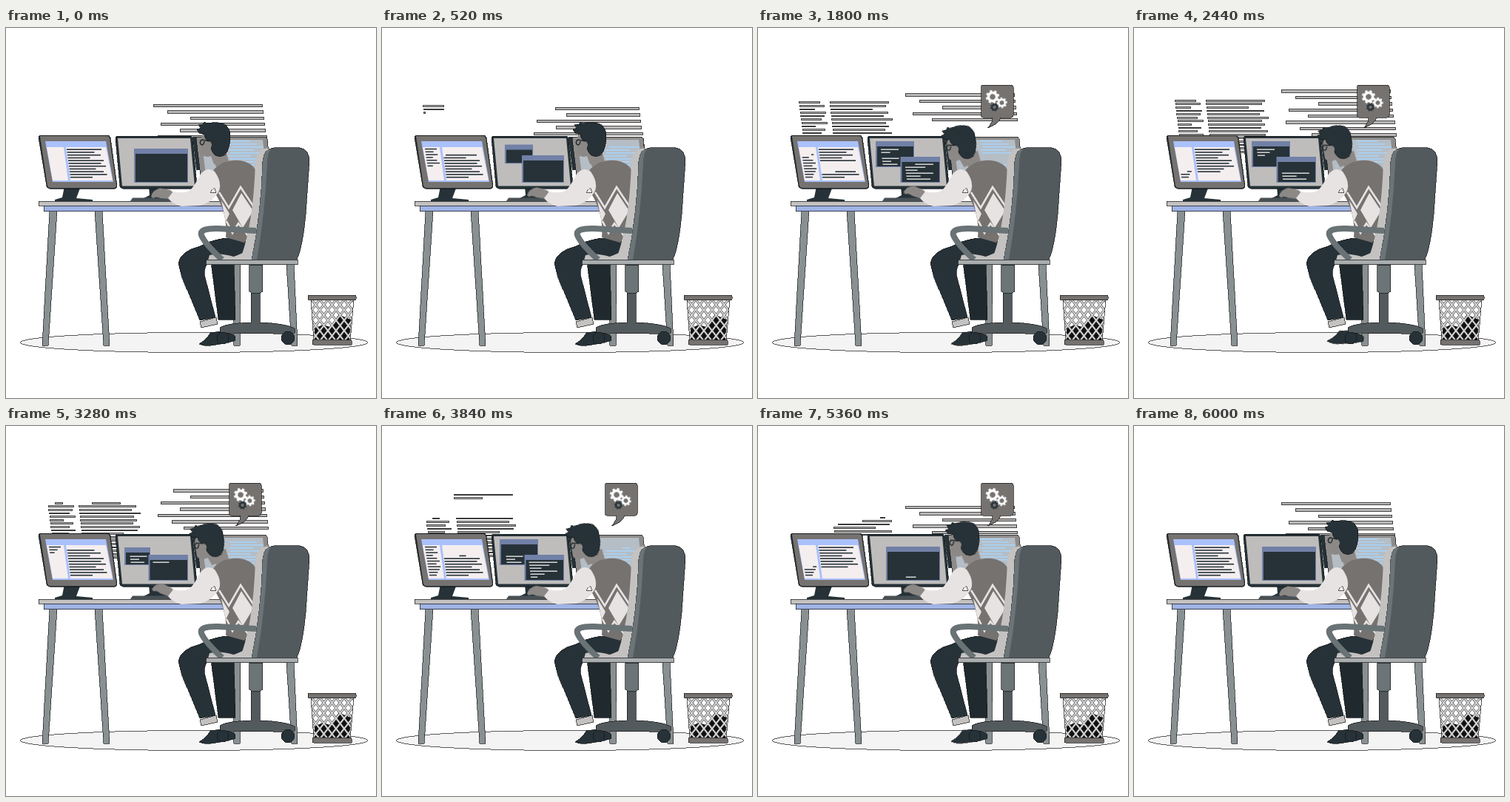
These frames come from a looping animation (500 by 500 pixels, 6040 ms). An HTML page:

```html
<!DOCTYPE html>
<html lang="en">
<head>
<meta charset="utf-8">
<title>Developer at work</title>
<style>
  html, body { margin: 0; width: 100%; height: 100%; overflow: hidden; background: #fff; }
  svg { display: block; width: 100vw; height: 100vh; }
  .o { stroke: #151515; stroke-width: .7; }
  .o, #floating { shape-rendering: crispEdges; }
  .dark { fill: #263238; }
  .steel { fill: #899092; }
  .pale { fill: #c4c2c1; }
  .slate { fill: #535a5d; }
  .grey { fill: #757270; }
  .skin { fill: #8c8886; }
  .shirt { fill: #e8e3e3; }
  .head, .foot, .hand, .bubble { animation: 6040ms linear infinite; }
  .head { animation-name: nod; transform-origin: 288px 176px; animation-timing-function: ease-in-out; }
  .foot { animation-name: tap; transform-origin: 300px 424px; }
  .hand { animation-name: type; transform-origin: 222px 228px; }
  .bubble { animation-name: pop; transform-origin: 312px 133px; }
  .gear { animation: spin 6040ms linear infinite; transform-box: fill-box; transform-origin: center; }
  .gear.back { animation-direction: reverse; }
  @keyframes nod {
    0%, 18% { transform: none; }
    26%, 84% { transform: translate(-4px, 3px) rotate(-10deg); }
    93%, 100% { transform: none; }
  }
  @keyframes tap {
    0%, 10%, 29%, 52%, 88%, 97%, 100% { transform: none; }
    18%, 40%, 92% { transform: rotate(6deg); }
  }
  @keyframes type {
    0%, 10%, 25%, 33%, 40%, 48%, 63%, 71%, 86%, 95%, 100% { transform: none; }
    5%, 18%, 29%, 36%, 44%, 54%, 67%, 78%, 90% { transform: rotate(17deg); }
  }
  @keyframes pop {
    0%, 11.5% { transform: scale(0); }
    16%, 94% { transform: none; }
    98%, 100% { transform: scale(0); }
  }
  @keyframes spin { to { transform: rotate(360deg); } }
</style>
</head>
<body>
<svg viewBox="0 0 500 500">
  <defs>
    <pattern id="mesh" width="11" height="14" patternUnits="userSpaceOnUse" x="413" y="367">
      <path d="M-1-1.27L12 15.27M12-1.27L-1 15.27" stroke="#333" stroke-width="3"/>
      <path d="M-1-1.27L12 15.27M12-1.27L-1 15.27" stroke="#d6d6d6" stroke-width="2"/>
    </pattern>
  </defs>

  <ellipse class="o" cx="254" cy="425" rx="235" ry="13.5" fill="#f4f4f4"/>
  <g id="floating" fill="#b9b7b6" stroke="#1c1c1c" stroke-width=".8"></g>

  <!-- right monitor -->
  <path class="dark" d="M252 147H259L265 192H257Z"/>
  <path class="o" fill="#8e8c8b" d="M257 150Q257 147 260 147H349Q352 147 353 150L358 200H263Z"/>
  <path fill="#b5bdc5" d="M264 151H347L352 198H270Z"/>
  <g id="third" fill="#a9d2f5"></g>

  <!-- left monitor -->
  <path class="dark" d="M79 214H101L95 230L117 232V234H66V232L76 229Z"/>
  <path class="dark o" d="M44 148Q44 145 47 145H137Q140 145 141 148L150 213Q150 217 147 217H59Q56 217 55 214Z"/>
  <path class="grey" d="M46 146H137Q139 146 140 149L149 213Q149 216 146 216H60Q57 216 56 213Z"/>
  <path fill="#aac1fb" d="M53 153H135L145 208H63Z"/>
  <path fill="#f4eeef" d="M55 161H78L84 206H63ZM81 161H135L144 206H87Z"/>
  <g id="side" class="dark"></g>
  <g id="code" class="dark"></g>

  <!-- middle monitor -->
  <path class="dark" d="M193 214H213L212 226H226V231H184L194 226Z"/>
  <path class="dark o" d="M148 149Q148 146 151 146H248Q251 146 252 149L258 213Q258 217 255 217H158Q155 217 154 214Z"/>
  <path fill="#bfbdbc" d="M151 149H249L255 213.500H157Z"/>
  <g id="windows"></g>

  <!-- desk -->
  <g class="steel o">
    <path d="M59 247H69L57 429H49ZM120 247H130L140 429H132Z"/>
    <path d="M307 319H317L316 429H308ZM379 319H389L394 429H386Z"/>
  </g>
  <path class="pale o" d="M44 234H302V240H44Z"/>
  <path class="o" fill="#9fb3e5" d="M51 240H302V247.500H51Z"/>
  <path fill="#485156" d="M171 229.500H226V234H168Z"/>

  <!-- legs -->
  <path class="o" fill="#20292d" d="M277 316H308L310 394H287Z"/>
  <path class="dark o" d="M324 283Q286 281 262 295Q235 302 233 318Q236 335 245 354L262 395L283 391L268 333Q268 320 276 314L322 306Z"/>
  <g class="foot">
    <path class="dark o" d="M261 427Q272 420 276 412L289 410L303 413Q311 414 310 422Q300 426 284 428Q268 431 261 427Z"/>
  </g>
  <path class="pale o" d="M262 397L284 391L286 400L264 405Z"/>

  <!-- body -->
  <path class="skin" d="M277 170L297 166L302 184L284 188Z"/>
  <path class="grey" d="M282 190Q298 175 321 180Q341 186 339 204L334 250Q331 280 322 290L297 283Q300 252 283 224Q272 204 282 190Z"/>
  <path class="shirt" d="M318 223L334 247L320 270L306 246ZM291 233L302 251L297 262Z"/>
  <path fill="none" stroke="#e8e3e3" stroke-width="2.600" d="M288 222L301 243L317 215L337 245M298 261L306 277L314 264L328 282"/>
  <g class="hand"><path class="skin" d="M196 228Q198 219 208 216.500L222 219Q232 226 222 231L209 230Q202 227 199 230Z"/></g>
  <path class="shirt" d="M262 199Q271 186 282 194Q292 208 288 220Q279 236 262 240L237 241Q225 238 219 230L226 221Q240 224 248 220Q256 212 262 199Z"/>
  <path fill="#fff" class="o" d="M276 222Q280 216 282 217L284 222Z"/>

  <g class="head">
    <path class="skin" d="M267 143Q262 148 263 156L263 169Q267 176 277 173L281 184L298 180L296 152Z"/>
    <path class="dark o" d="M261 142L258 137L263 135L260 131L266 130L268 127L271 129Q302 123 303 145Q303 162 297 170Q290 176 283 172Q275 166 277 153Q269 153 268 144Z"/>
    <circle class="skin" cx="274" cy="158" r="4"/>
    <path fill="none" stroke="#20292d" stroke-width="1.500" d="M275 153L265 151Q261 153 263 157Q267 160 268 153"/>
  </g>

  <!-- chair -->
  <path class="pale" d="M337 182Q339 164 352 162.500L362 164L346 313H316Q334 270 337 182Z"/>
  <path class="slate o" d="M347 180Q348 163 362 162L396 161.500Q410 164 410 180L405 252Q401 296 393 313H332Q345 250 347 180Z"/>
  <path fill="#6b7477" d="M347 180Q348 165 358 163Q353 170 353 182Q350 252 339 313H332Q345 250 347 180Z"/>
  <path class="pale" d="M275 307Q288 303 308 309L320 304V314H273Z"/>
  <path fill="none" stroke="#697275" stroke-width="8" d="M338 274L287 271Q261 270 264 280Q269 292 292 313"/>
  <path class="o" fill="#a9adae" d="M272 313H394V319.500H270Q269 315 272 313Z"/>
  <path class="slate o" d="M331 356H343V398Q378 399 390 406V412H289V405Q296 399 331 398Z"/>
  <path class="o" fill="#6b7477" d="M328.500 320H346.500V356L343 358H332L328.500 356Z"/>
  <g class="dark o"><circle cx="381" cy="419" r="9"/><circle cx="293" cy="419" r="8"/></g>

  <!-- bin -->
  <path fill="#fff" d="M412 367H470L465 423H416Z"/>
  <path fill="#111" d="M417 421L417 406L428 401L438 404L450 387L456 390L466 394L464 422Z"/>
  <path class="o" fill="url(#mesh)" d="M412 367H470L465 423H416Z"/>
  <rect class="grey o" x="408" y="361" width="65" height="6.500" rx="1.500"/>
  <rect class="grey o" x="414" y="421.500" width="53" height="6.500" rx="1.500"/>

  <!-- thought -->
  <g class="bubble">
    <path class="grey o" d="M304 77H342Q345 77 345 80V118Q345 121 342 121H328Q324 131 310 135Q317 128 317 121H304Q301.500 121 301.500 118V80Q301.500 77 304 77Z"/>
    <g id="gears" fill="none"></g>
  </g>
</svg>
<script>
const LOOP = 6040, HALF = LOOP / 2, DARK = '#263238';
const $ = id => document.getElementById(id);
const clamp = v => Math.max(0, Math.min(1, v));

function add(parent, tag, attrs) {
  const el = document.createElementNS('http://www.w3.org/2000/svg', tag);
  set(el, attrs);
  return parent.appendChild(el);
}
function set(el, attrs) {
  for (const k in attrs) el.setAttribute(k, attrs[k]);
}
// Piecewise linear value at time t
function at(t, keys) {
  let i = 1;
  while (i < keys.length - 1 && t > keys[i][0]) i++;
  const [a, u] = keys[i - 1], [b, v] = keys[i];
  return u + (v - u) * clamp((t - a) / (b - a));
}

// Each bar is typed from the left at "on" and wiped from the left at "off".
const bars = [];
function group(parent, n, h, place, times, dur, period = LOOP) {
  for (let i = 0; i < n; i++)
    bars.push({ el: add(parent, 'rect', { height: h }), i, place, times: times(i), dur, period });
}
function drawBar({ el, i, place, times, dur, period }, time) {
  const t = time % period;
  const [on, off] = times.filter(s => s[0] <= t).pop() || [9e9, 9e9];
  const from = clamp((t - off) / dur), to = clamp((t - on) / dur);
  const [x, y, w] = place(i, time);
  const shown = w * (to - from);
  set(el, { x: x + w * from, y, width: Math.max(0, shown), visibility: shown > .3 ? 'visible' : 'hidden' });
}

const never = 9e9, before = -9e9;
const slowY = t => 103.4 - .0038 * (t - 1120);
const fastY = t => 104.7 - .0079 * (t < 3950 ? t : t - LOOP);

const leftW = [28, 33, 20, 34, 32, 27, 34, 18, 30, 25, 32, 22];
group($('floating'), 12, 1.7, (i, t) => [55.5 + i * .6, slowY(t) + 4.6 * i - 1, leftW[i]],
  i => [[350 + i * 80, 3000 + i * 112]], 110);

const midW = [79, 75, 56, 77, 70, 82, 72, 76, 70];
group($('floating'), 19, 1.7, (i, t) => [97 + i * .5, slowY(t) + 4.6 * i - 1, midW[i % 9]],
  i => [[700 + i * 105, 3000 + i * 120], [3660 + i * 120, 4850 + i * 50]], 120);

const rightX = [199, 218, 249, 209, 235, 205, 224, 240];
group($('floating'), 8, 3.4, (i, t) => [rightX[i], fastY(t) + 8.4 * i - 1.5, 346 + i * 1.2 - rightX[i]],
  i => [[before, 350 + i * 160], [600 + i * 250, 3195 + i * 80], [4050 + i * 110, never]], 80);

const codeW = [47, 37, 45, 30, 48, 44, 50, 36, 46, 50, 30];
const rewrite = i => [[before, 100 + i * 205], [900 + i * 180, never]];
group($('code'), 11, 1.6, (i) => [82 + i * .5, 163.4 + 3.75 * i, codeW[i]], rewrite, 150, HALF);
group($('third'), 9, 1.7, (i) => [300 + i * 2 % 5, 152 + 4 * i, 30 + i * 7 % 17], rewrite, 150, HALF);

const sideW = [16, 11, 16, 9, 14, 17, 12, 17, 15, 12, 10];
group($('side'), 11, 1.5, (i) => [58 + i * .6, 162.8 + 3.8 * i, sideW[i]],
  i => [[100 + i * 60, 1500 + i * 110]], 100, HALF);

// Console windows: left, top, right, bottom over time
const consoles = [
  { x: [[300, 185], [600, 159], [3050, 159], [3200, 160], [3400, 160], [3550, 159]],
    y: [[300, 170], [600, 153], [3000, 153], [3200, 164], [3350, 164], [3600, 153]],
    r: [[300, 185], [600, 211], [3000, 211], [3200, 195], [3350, 195], [3600, 211]],
    b: [[300, 170], [600, 188]], show: [400, 5300] },
  { x: [[150, 173], [600, 192.500], [4450, 192.500], [4860, 173]],
    y: [[150, 163], [600, 174], [4450, 174], [4860, 163]],
    r: [[0, 246], [1, 246]], b: [[0, 209], [1, 209]], show: [-1, never] }
];
const rowW = [24, 17, 10, 23, 12, 20];
const rowTimes = [
  i => i < 3
    ? [[1500 + i * 200, 2800 + i * 150], [4200 + i * 100, never]]
    : [[500 + i * 80, 1750 + i * 60], [2750 + i * 80, 4600 + i * 80]],
  i => [[600 + i * 60, 1750 + i * 250], [3200 + i * 120, 4880 + i * 80]]
];
consoles.forEach((c, k) => {
  c.g = add($('windows'), 'g', {});
  c.bar = add(c.g, 'rect', {});
  c.body = add(c.g, 'rect', { fill: DARK });
  const rows = add(c.g, 'g', { fill: '#e6e3e3' });
  group(rows, 6, 1.4, (i, t) => k
    ? [at(t, c.x) + 6 + i * .5, 183.500 + 4 * i, rowW[i] * 1.6]
    : [166 + i * .5, 163.500 + 4 * i, rowW[i]], rowTimes[k], 140);
});
function drawConsole(c, t) {
  const x = at(t, c.x), y = at(t, c.y), w = at(t, c.r) - x, h = at(t, c.b) - y;
  const head = Math.min(7, h);
  set(c.g, { display: t > c.show[0] && t < c.show[1] ? 'inline' : 'none' });
  set(c.bar, { x, y, width: w, height: h, fill: t > 760 && t < 1500 ? '#407bff' : '#7180a6' });
  set(c.body, { x: x + 2, y: y + head, width: Math.max(0, w - 3), height: Math.max(0, h - head - 1) });
}

function gear(x, y, r, color, back) {
  const g = add($('gears'), 'g', { class: back ? 'gear back' : 'gear', stroke: color });
  add(g, 'circle', { cx: x, cy: y, r: r * .62, 'stroke-width': r * .4 });
  add(g, 'circle', { cx: x, cy: y, r: r * .88, 'stroke-width': r * .28, pathLength: 16, 'stroke-dasharray': '1 1' });
}
gear(317, 93, 9, '#fff');
gear(329.5, 101, 7, '#fff', true);
gear(319.5, 107, 5.5, DARK);

let start;
function frame(now) {
  start ??= now;
  const t = (now - start) % LOOP;
  bars.forEach(b => drawBar(b, t));
  consoles.forEach(c => drawConsole(c, t));
  requestAnimationFrame(frame);
}
requestAnimationFrame(frame);
</script>
</body>
</html>
```
